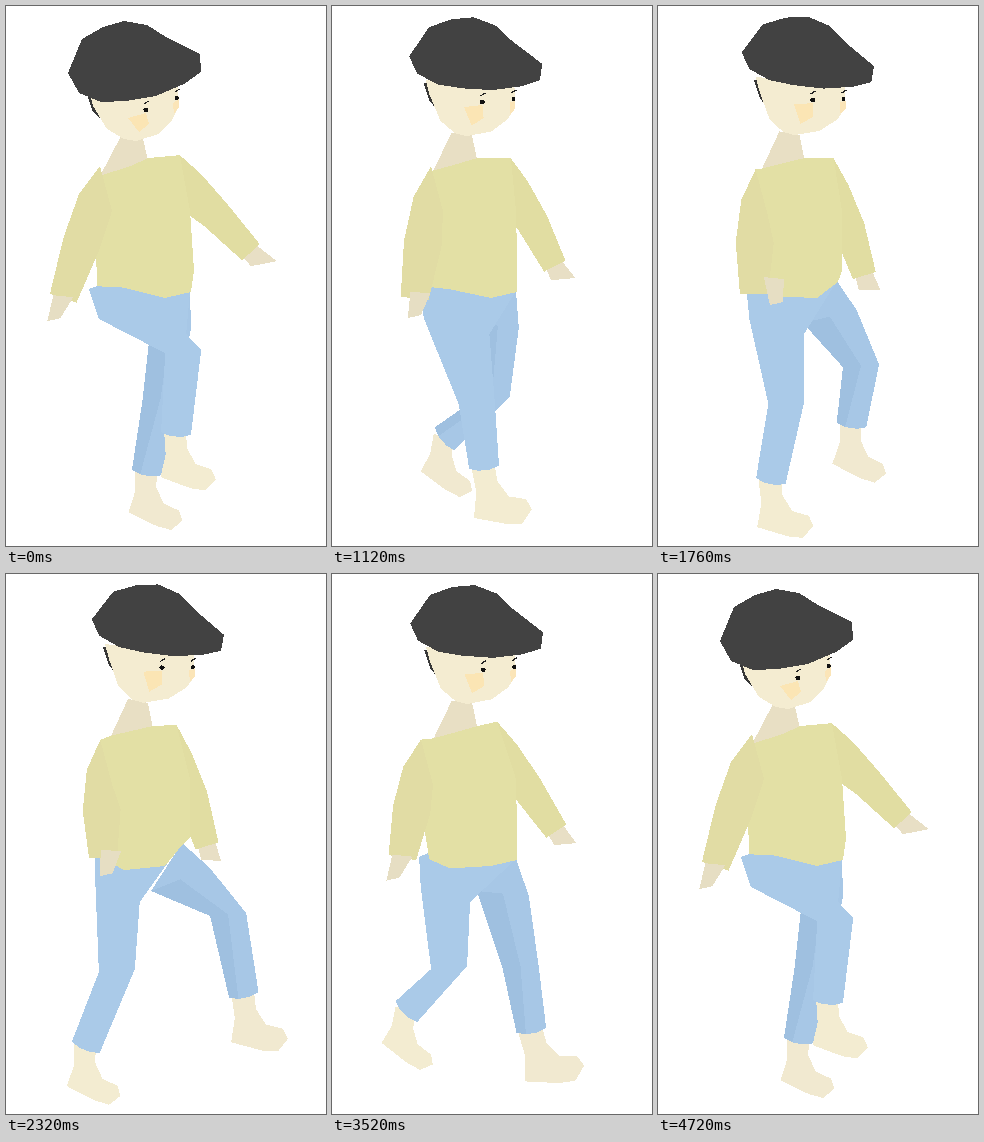
Write an HTML page that moves like this. It is 320 by 540 pixels and loops after 4800 ms.

```html
<!DOCTYPE html>
<html lang="en">
<head>
<meta charset="utf-8">
<title>Walk</title>
<style>
  html, body { margin: 0; width: 100%; height: 100%; overflow: hidden; background: #fff; }
  svg { display: block; width: 100%; height: 100%; }
</style>
</head>
<body>
<svg viewBox="0 0 320 540" shape-rendering="crispEdges">
  <polygon id="farFoot" fill="#f1e9d0"/>
  <polygon id="farLeg" fill="#a7c7e6"/>
  <polygon id="farShade" fill="#9fc0e0"/>
  <polygon id="nearFoot" fill="#f3ecd1"/>
  <polygon id="nearLeg" fill="#aacae8"/>
  <polygon id="neck" fill="#e8dfc4"/>
  <polygon id="farHand" fill="#e8dfc5"/>
  <polygon id="farArm" fill="#e1dda2"/>
  <polygon id="torso" fill="#e3e0a5"/>
  <polygon id="nearArm" fill="#e1dca4"/>
  <polygon id="nearHand" fill="#e6dec3"/>
  <polygon id="hair" fill="#383838"/>
  <polygon id="face" fill="#f4ecd1"/>
  <polygon id="blush" fill="#fbe5b4"/>
  <polygon id="blushFar" fill="#fbe5b8"/>
  <polygon id="hat" fill="#424242"/>
  <g fill="#111">
    <ellipse id="eye" rx="2.6" ry="2.2"/>
    <ellipse id="eyeFar" rx="1.9" ry="2.3"/>
  </g>
  <g fill="none" stroke="#222" stroke-width="1.3">
    <polyline id="brow"/>
    <polyline id="browFar"/>
  </g>
</svg>
<script>
const LOOP = 4800, STEP = 80, CYCLE = LOOP - STEP;
const RAD = Math.PI / 180;

// Resting shapes
const hat = [
  [-68, 7], [-54, -27], [-33, -39], [-12, -45], [11, -41], [30, -29], [64, -12],
  [65, 6], [48, 18], [20, 30], [-10, 35], [-35, 36], [-57, 27]
];
const face = [
  [83, 85], [87, 100], [101, 123], [118, 133], [130, 135], [153, 128],
  [166, 114], [173, 100], [172, 80]
];
const hair = [[81, 88], [87, 106], [94, 113], [91, 100], [87, 88]];
const blush = [[122, 112], [140, 107], [143, 118], [133, 126]];
const blushFar = [[167, 97], [173, 93], [173, 101], [168, 108]];
const eyes = { eye: [140, 104], eyeFar: [171, 92] };
const brows = { brow: 'eye', browFar: 'eyeFar' };

// Foot outline as weights of the heel and toe vectors
const footShape = [
  [.2, -.22], [-.18, .14], [-.18, .187], [.037, .288], [.125, .544], [-.083, .862],
  [0, 1], [.38, .88], [.62, .6], [1, 0], [.537, -.049]
];

const ease = s => (1 - Math.cos(Math.PI * s)) / 2;

// x: ankle stride; y: ankle height; the far leg is half a cycle away
const legs = {
  near: { turn: 0, start: 3080, rise: 1920, lo: 60, hi: 176, fall: ease,
          ground: 450, kneeX: 137, kneeY: 396, peak: -10, pitch: [.5, .5, 255] },
  far: { turn: 180, start: 780, rise: 1580, lo: 97, hi: 238, fall: s => s ** 1.3,
         ground: 444, kneeX: 182, kneeY: 392, peak: 177, pitch: [.35, .6, 70] }
};

const el = id => document.getElementById(id);
const put = (id, pts) =>
  el(id).setAttribute('points', pts.map(p => p.map(v => v.toFixed(2)).join()).join(' '));
const add = ([x, y], dx, dy) => [x + dx, y + dy];
const mix = (a, b, k) => [a[0] + (b[0] - a[0]) * k, a[1] + (b[1] - a[1]) * k];

// Unit normal of the line from a to b
function normal(a, b) {
  const dx = b[0] - a[0], dy = b[1] - a[1], d = Math.hypot(dx, dy);
  return [dy / d, -dx / d];
}

function stride(t, { start, rise, lo, hi, fall }) {
  const s = (t - start + CYCLE) % CYCLE;
  return s < rise
    ? lo + (hi - lo) * ease(s / rise)
    : hi - (hi - lo) * fall((s - rise) / (CYCLE - rise));
}

function draw(t) {
  const deg = 360 * t / CYCLE;
  const cos = a => Math.cos((deg - a) * RAD);
  const wave = (mid, size, peak) => mid + size * cos(peak);
  const bump = (peak, power) => Math.max(0, cos(peak)) ** power;
  const u = Math.sin(deg / 2 * RAD) ** 1.1; // how far the body is turned
  const v = u * (1.5 - .5 * u);             // head tilt runs a little ahead

  function joints(leg) {
    const lift = bump(leg.peak, 1.5);
    const knee = [
      wave(leg.kneeX, 36, 20 + leg.turn) + 9 * Math.cos((2 * deg + 45) * RAD),
      leg.kneeY - 52 * lift];
    const ankle = [stride(t, leg), wave(leg.ground, -26, 330 - leg.turn)];
    const [nx, ny] = normal(knee, ankle);
    const hem = [-15, -6, 6, 15].map((w, i) => {
      const drop = i % 3 ? 3 : 0;
      return add(ankle, nx * w - ny * drop, ny * w + nx * drop);
    });
    return { lift, ankle, hem, back: add(knee, -18, 2), front: add(knee, 18, -1) };
  }

  function foot(id, ankle, pitch) {
    const k = wave(...pitch);
    const heel = [-10 - 15 * k, 51 - 20 * Math.max(k, 0)];
    const toe = add(heel, 58 - 7 * k, 31 * k - 9);
    put(id, footShape.map(([h, s]) =>
      add(ankle, h * heel[0] + s * toe[0], h * heel[1] + s * toe[1])));
  }

  function arm(id, top, wrist, side, width, cuff, bulge) {
    const root = add(top, 0, 22), elbow = mix(root, wrist, .5);
    const [nx, ny] = normal(root, wrist);
    const off = (p, w) => add(p, nx * w * side, ny * w * side);
    put(id, [top, off(mix(top, off(elbow, width), .42), bulge), off(elbow, width),
      off(wrist, cuff), off(wrist, -cuff), off(elbow, -width), add(top, -12 * side, 45)]);
    return [off(wrist, cuff - 3), off(wrist, 3 - cuff)];
  }

  // Legs
  const near = joints(legs.near), far = joints(legs.far);
  const waistL = [83 + 6 * u, 283], waistR = [184 - 8 * far.lift, 285 - 16 * far.lift];
  const crotch = [145, 317];
  const thigh = [waistL[0] + .13 * (near.back[0] - waistL[0]), 313];
  const lap = [145 + .7 * (near.front[0] - 145), 328];
  const farLap = add(mix(waistR, far.front, .35), 5, 0);
  put('nearLeg', [waistL, thigh, near.back, ...near.hem, near.front, lap, waistR, [100, 277]]);
  put('farLeg', [crotch, far.back, ...far.hem, far.front, farLap, waistR]);
  put('farShade', [crotch, far.back, ...far.hem.slice(0, 2),
    mix(far.back, far.front, .5), mix(crotch, farLap, .5)]);
  foot('nearFoot', near.ankle, legs.near.pitch);
  foot('farFoot', far.ankle, legs.far.pitch);

  // Sweater
  const shoulderL = [wave(94, 5, 90), wave(163, -4, 40)];
  const shoulderR = [wave(172, 7, 75), wave(150, 2.5, 110)];
  const collarL = [93 + 11 * u, 170 - 8 * u], collarR = [142 + 5 * u, 152];
  const hem = wave(289, 9, 215);
  put('neck', [[115 + 7 * u, 130 - 5 * u], [136 + 6 * u, 129], add(collarR, 0, 2),
    [127, 164], add(collarL, 0, 2)]);
  put('torso', [shoulderL, collarL, [125, 160 - 3 * u], collarR, shoulderR, [184, 205],
    [188 - 4 * u, 264], add(waistR, 1, 1), [159, 292], [118, hem],
    [91 + 9 * u, 280 + .4 * (hem - 281)], [90, 240]]);

  // Arms
  const wrist = [wave(77, 21, 160), wave(288, -6, 225)];
  const wristFar = [wave(223, 22, -5), wave(259, -13, -10)];
  arm('nearArm', shoulderL, wrist, -1, 19, 14, 6);
  const [out, inner] = arm('farArm', shoulderR, wristFar, 1, 16, 12, 2);
  const bend = bump(134, 3), palm = add(wrist, 20 * bend, -3 - 14 * bend);
  const tip = add(wrist, 32 * bend - 9, 22 - 12 * bend);
  put('nearHand', [add(palm, -10, 0), add(tip, -7, 1), add(tip, 6, -2), add(palm, 10, 2)]);
  put('farHand', [out, add(wristFar, wave(20, 6, 0), wave(12, -3, 0)),
    add(wristFar, wave(-3, 3, -20), 14), inner]);

  // Head: features slide round, the chin stays near the neck
  const turned = ([x, y]) => {
    const k = Math.min(1, 1 - (y - 110) / 45);
    return [x + 16 * u * k, y + Math.max(-15, (x - 168) * .37) * v * k];
  };
  const shapes = { face, hair, blush, blushFar };
  for (const id in shapes) put(id, shapes[id].map(turned));

  const c = Math.cos(14 * v * RAD), s = Math.sin(14 * v * RAD);
  put('hat', hat.map(([x, y]) => {
    const h = y > 0 ? y * (1 - .3 * v) : y;
    return [130 + 23 * u + x * c - h * s, 60 - 3 * v + x * s + h * c];
  }));

  for (const id in eyes) {
    const [x, y] = turned(eyes[id]);
    el(id).setAttribute('cx', x);
    el(id).setAttribute('cy', y);
  }
  for (const id in brows) {
    const p = turned(eyes[brows[id]]);
    put(id, [add(p, -2, -6), add(p, 1, -8), add(p, 3, -9)]);
  }
}

function tick(now) {
  const t = Math.floor(now % LOOP / STEP) * STEP;
  draw(t % CYCLE);
  requestAnimationFrame(tick);
}
draw(0);
requestAnimationFrame(tick);
</script>
</body>
</html>
```
